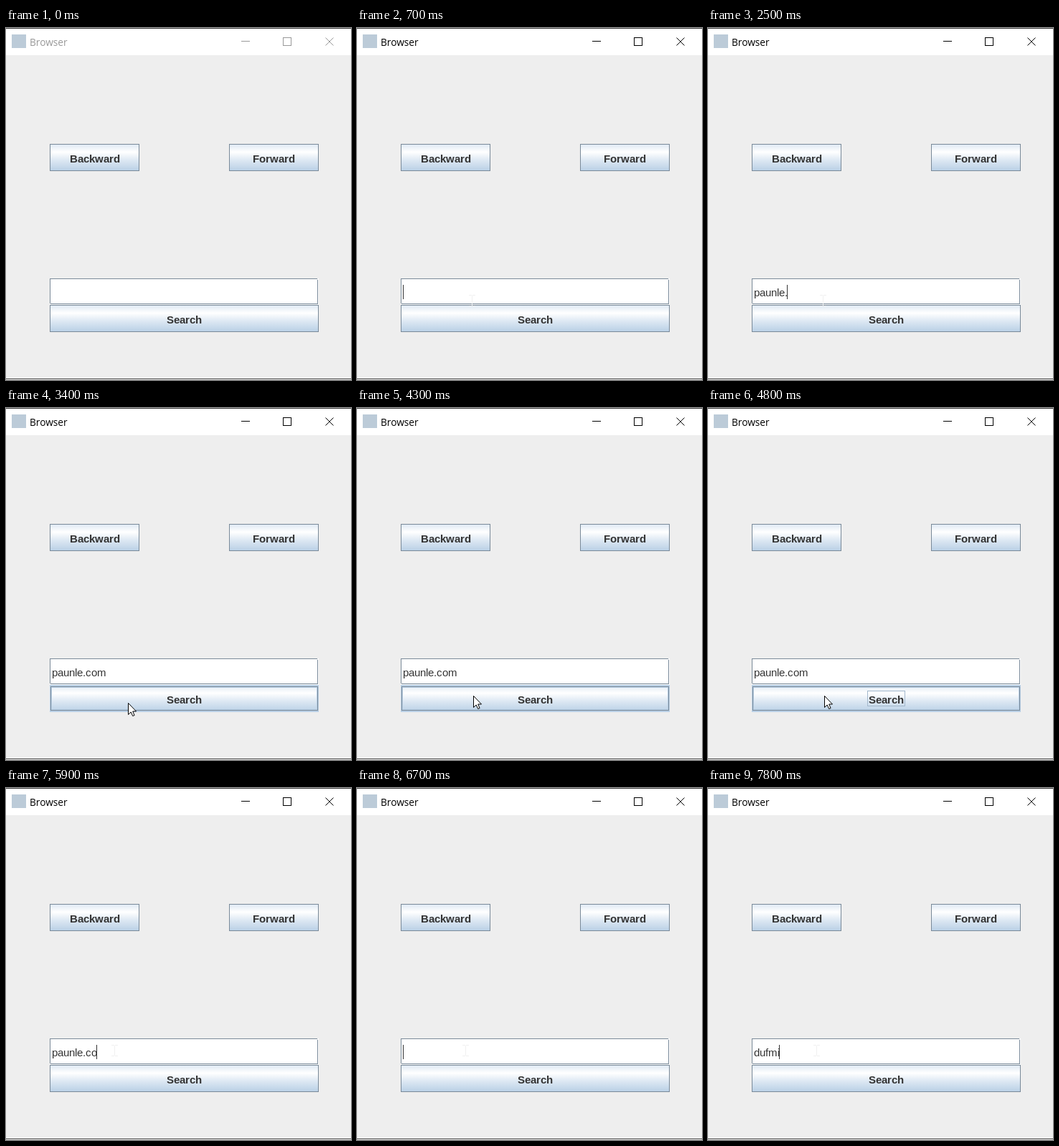
Recreate the animation shown at these times as an HTML page with a canvas. Size 481 px wide and 492 px high, loop 8 s.

```html
<!DOCTYPE html>
<html lang="en">
<head>
<meta charset="utf-8">
<title>Browser</title>
<style>
  html, body { margin: 0; width: 100%; height: 100%; overflow: hidden; background: #eee; }
  canvas { display: block; }
</style>
</head>
<body>
<canvas id="stage" width="481" height="492"></canvas>
<script>
const ctx = document.getElementById('stage').getContext('2d');
const LOOP = 8000;
const BORDER = '#7a8a99', LIGHT = '#b8cfe5', FOCUS = '#a3b8cc', INK = '#333';
const SANS = '"Liberation Sans", Arial, sans-serif';
const ADDRESS = 'paunle.com', WORD = 'dufmi';

// Each track lists [start time, value]; a value holds until the next start.
const typed = [
  [0, ''],
  ...[1400, 1500, 1600, 1800, 2000, 2100, 2500, 2600, 2700, 2800]
    .map((t, i) => [t, ADDRESS.slice(0, i + 1)]),
  ...[[5900, 9], [6500, 6], [6600, 3], [6700, 0]].map(([t, n]) => [t, ADDRESS.slice(0, n)]),
  ...[7000, 7100, 7300, 7400, 7800].map((t, i) => [t, WORD.slice(0, i + 1)])
];
const caretShown = [
  [0, false], [700, true], [1100, false], [1400, true],
  [3300, false], [3700, true], [4200, false], [5500, true]
];
const searchState = [
  [0, 'normal'], [300, 'hover'], [500, 'normal'], [3300, 'hover'],
  [4600, 'pressed'], [4800, 'hover'], [5100, 'normal']
];
const searchFocus = [[0, false], [4600, true], [5500, false]];
const pointer = [
  [0, null],
  [200, ['arrow', 150, 260]], [300, ['arrow', 170, 400]], [400, ['arrow', 165, 393]],
  [500, ['beam', 160, 373]],
  [3300, ['arrow', 164, 398]], [3400, ['arrow', 170, 412]], [3500, ['arrow', 174, 422]],
  [4100, ['arrow', 172, 416]], [4200, ['arrow', 166, 407]], [4300, ['arrow', 162, 402]],
  [5100, null], [5500, ['beam', 151, 359]]
];
const at = (track, t) => track.findLast(([start]) => start <= t)[1];

function fill(color, x, y, w, h) {
  ctx.fillStyle = color;
  ctx.fillRect(x, y, w, h);
}

function outline(color, x, y, w, h) {
  ctx.strokeStyle = color;
  ctx.lineWidth = 1;
  ctx.strokeRect(x + .5, y + .5, w - 1, h - 1);
}

function path(points) {
  ctx.beginPath();
  points.forEach(([x, y]) => ctx.lineTo(x, y));
}

// Text is set on whole-pixel advances.
const advance = c => Math.round(ctx.measureText(c).width + .01);
const textWidth = text => [...text].reduce((sum, c) => sum + advance(c), 0);

function drawText(text, x, y) {
  ctx.fillStyle = INK;
  for (const c of text) {
    ctx.fillText(c, x, y);
    x += advance(c);
  }
}

function drawTitleBar(active) {
  const color = active ? '#000' : '#999';
  fill('#fff', 0, 0, 481, 38);
  fill('#3c3c3c', 0, 0, 481, 1);
  fill('#bccbd8', 8, 9, 20, 19);
  ctx.fillStyle = color;
  ctx.font = '13.7px "Open Sans", sans-serif';
  ctx.fillText('Browser', 33, 25);
  fill(color, 328, 18, 12, 1);
  outline(color, 386, 13, 12, 12);
  path([[445.5, 13.5], [456.5, 24.5]]);
  ctx.stroke();
  path([[456.5, 13.5], [445.5, 24.5]]);
  ctx.stroke();
}

function drawButton(label, x, y, w, state = 'normal', focused = false) {
  const h = 38;
  const shade = ctx.createLinearGradient(0, y, 0, y + h);
  [[0, '#dde8f3'], [.3, '#fff'], [.6, '#dde8f3'], [1, LIGHT]]
    .forEach(stop => shade.addColorStop(...stop));
  fill(state === 'pressed' ? LIGHT : shade, x, y, w, h);
  if (state === 'hover') {
    outline(LIGHT, x, y, w, h);
    outline(LIGHT, x + 1, y + 1, w - 2, h - 2);
    outline(BORDER, x + 1, y + 2, w - 2, h - 4);
    outline(LIGHT, x + 2, y + 3, w - 4, h - 6);
  } else {
    outline(BORDER, x, y, w, h);
  }
  ctx.font = 'bold 15px ' + SANS;
  const width = textWidth(label);
  const left = Math.round(x + w / 2 - width / 2);
  if (focused) outline(FOCUS, left - 2, y + 8, width + 4, 22);
  drawText(label, left, y + 26);
}

function drawField(text, caret) {
  fill('#fff', 61, 350, 375, 37);
  outline(BORDER, 61, 350, 374, 36);
  fill('#eee', 434, 350, 1, 2);
  fill('#eee', 61, 385, 1, 1);
  ctx.font = '15px ' + SANS;
  drawText(text, 64, 375);
  if (caret) fill(INK, text ? 63 + textWidth(text) : 64, 359, 1, 20);
}

function drawPointer(kind, x, y) {
  if (kind === 'beam') {
    fill('#f0f0f0', x - 4, y, 4, 1);
    fill('#f0f0f0', x + 1, y, 4, 1);
    fill('#f0f0f0', x, y + 1, 1, 14);
    fill('#f0f0f0', x - 4, y + 15, 4, 1);
    fill('#f0f0f0', x + 1, y + 15, 4, 1);
    return;
  }
  ctx.save();
  ctx.translate(x + .5, y + .5);
  path([[0, 0], [0, 16], [3.7, 12.5], [6.2, 18], [8.6, 17], [6.2, 11.5], [11, 11.5]]);
  ctx.closePath();
  ctx.fillStyle = '#fff';
  ctx.strokeStyle = '#000';
  ctx.fill();
  ctx.stroke();
  ctx.restore();
}

function draw(t) {
  fill('#eee', 0, 0, 481, 492);
  drawTitleBar(t >= 700);
  fill('#3c3c3c', 0, 490, 481, 1);
  fill('#fff', 0, 491, 481, 1);
  drawButton('Backward', 61, 162, 125);
  drawButton('Forward', 311, 162, 125);
  drawField(at(typed, t), at(caretShown, t));
  drawButton('Search', 61, 387, 375, at(searchState, t), at(searchFocus, t));
  const mouse = at(pointer, t);
  if (mouse) drawPointer(...mouse);
}

const begin = performance.now();
function tick() {
  draw((performance.now() - begin) % LOOP);
  requestAnimationFrame(tick);
}
tick();
</script>
</body>
</html>
```
